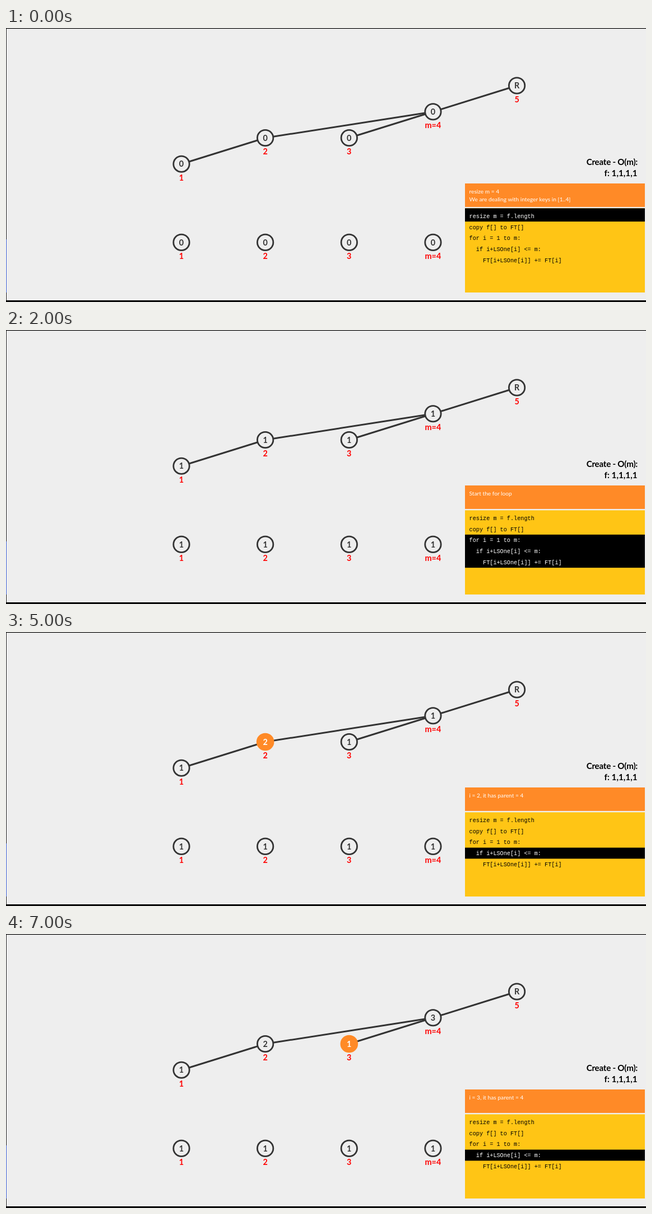
Write an HTML page that moves like this. It is 1142 px wide and 490 px high and loops after 8000 ms.

```html
<!DOCTYPE html>
<html lang="en">
<head>
<meta charset="utf-8">
<title>Tree construction</title>
<style>
html, body { margin: 0; width: 100%; height: 100%; overflow: hidden; background: #eee; }
svg { display: block; width: 1142px; height: 490px; }
text { font-family: Lato, "Open Sans", sans-serif; white-space: pre; }
.key, .val { font-weight: 700; font-size: 14.4px; text-anchor: middle; }
.key { fill: #f00; }
.title { font-weight: 700; font-size: 15.2px; text-anchor: end; }
.note { font-size: 10.2px; fill: #fff; }
.code { font-family: "Liberation Mono", monospace; font-size: 10.2px; }
</style>
</head>
<body>
<svg id="stage" viewBox="0 0 1142 490"></svg>
<script>
const stage = document.getElementById("stage");
const DARK = "#333", BG = "#eee", ORANGE = "#ff8a27", TEAL = "#2bbad2", RED = "#d9513c";
const STEP = 1000;

function add(tag, attrs, content = "") {
  const el = document.createElementNS("http://www.w3.org/2000/svg", tag);
  set(el, attrs);
  el.textContent = content;
  stage.append(el);
  return el;
}
function set(el, attrs) {
  for (const name in attrs) el.setAttribute(name, attrs[name]);
}
function box(x, y, width, height, fill) {
  return add("rect", { x, y, width, height, fill });
}
function label(x, y, cls, content = "") {
  return add("text", { x, y, class: cls }, content);
}

// Each step: message, first and last active code line, tree values, active nodes, active edge.
const steps = [
  { note: ["resize m = 4", "We are dealing with integer keys in [1..4]"], lines: [0, 0], vals: "0000", base: "0" },
  { note: ["Copy f[] to FT[]"], lines: [1, 1], vals: "1111", on: [0, 1, 2, 3], copy: true },
  { note: ["Start the for loop"], lines: [2, 4], vals: "1111" },
  { note: ["i = 1, it has parent = 2"], lines: [3, 3], vals: "1111", on: [0] },
  { note: ["i = 1, it has parent = 2", "FT[2] += 1 (it's value is now = 2)"], lines: [4, 4], vals: "1211", on: [0, 1], edge: 0 },
  { note: ["i = 2, it has parent = 4"], lines: [3, 3], vals: "1211", on: [1] },
  { note: ["i = 2, it has parent = 4", "FT[4] += 2 (it's value is now = 3)"], lines: [4, 4], vals: "1213", on: [1, 3], edge: 1 },
  { note: ["i = 3, it has parent = 4"], lines: [3, 3], vals: "1213", on: [2] }
];

box(0, 0, 1142, 490, BG);
box(0, 0, 1142, 1.2, "#000");
box(0, 0, 1, 490, "#222");
box(0, 378, 1, 95, "#3f62d8");
box(0, 487, 1142, 3, "#000");

const colX = i => 313 + 149.65 * i;
const level = [3, 2, 2, 1, 0];
const treeY = i => 103 + 46.75 * level[i];
const keys = ["1", "2", "3", "m=4", "5"];

const edges = [[0, 1], [1, 3], [2, 3], [3, 4]].map(([a, b]) => add("line", {
  x1: colX(a), y1: treeY(a), x2: colX(b), y2: treeY(b), "stroke-width": 3
}));

function makeNode(i, y) {
  const x = colX(i);
  const ring = add("circle", { cx: x, cy: y, r: 14.2 });
  const val = label(x, y + 5.2, "val");
  label(x, y + 29.7, "key", keys[i]);
  return { ring, val };
}
function paintNode(node, value, color) {
  set(node.ring, {
    fill: color || BG, stroke: color || DARK, "stroke-width": color ? 3.2 : 2.8
  });
  node.val.setAttribute("fill", color ? "#fff" : DARK);
  node.val.textContent = value;
}
const tree = keys.map((_, i) => makeNode(i, treeY(i)));
const row = [0, 1, 2, 3].map(i => makeNode(i, 383.4));

set(label(1127, 245, "title", "Create - O(m):"), { "letter-spacing": -0.25 });
label(1126.5, 264.6, "title", "f: 1,1,1,1");

box(819, 278, 321, 42, ORANGE);
const notes = [296.4, 309.8].map(y => label(826.5, y, "note"));

box(819, 322.4, 321, 150.6, "#ffc515");
const bar = box(819, 0, 321, 0, "#000");
const code = [
  "resize m = f.length",
  "copy f[] to FT[]",
  "for i = 1 to m:",
  "  if i+LSOne[i] <= m:",
  "    FT[i+LSOne[i]] += FT[i]"
].map((line, i) => label(826.6, 339.8 + 19.75 * i, "code", line));

function draw(time) {
  const s = steps[Math.floor(time / STEP) % steps.length];
  const on = s.on || [];

  tree.forEach((node, i) => paintNode(node, s.vals[i] || "R", on.includes(i) && ORANGE));
  row.forEach(node => paintNode(node, s.base || "1", s.copy && TEAL));
  edges.forEach((edge, i) => edge.setAttribute("stroke", i === s.edge ? RED : DARK));
  notes.forEach((note, i) => { note.textContent = s.note[i] || ""; });

  const [first, last] = s.lines;
  const top = first ? 326.4 + 19.75 * first : 322.4;
  set(bar, { y: top, height: 326.4 + 19.75 * (last + 1) - top });
  code.forEach((line, i) => line.setAttribute("fill", i >= first && i <= last ? "#fff" : "#000"));
}

let start;
function tick(now) {
  start ??= now;
  draw(now - start);
  requestAnimationFrame(tick);
}
draw(0);
requestAnimationFrame(tick);
</script>
</body>
</html>
```
